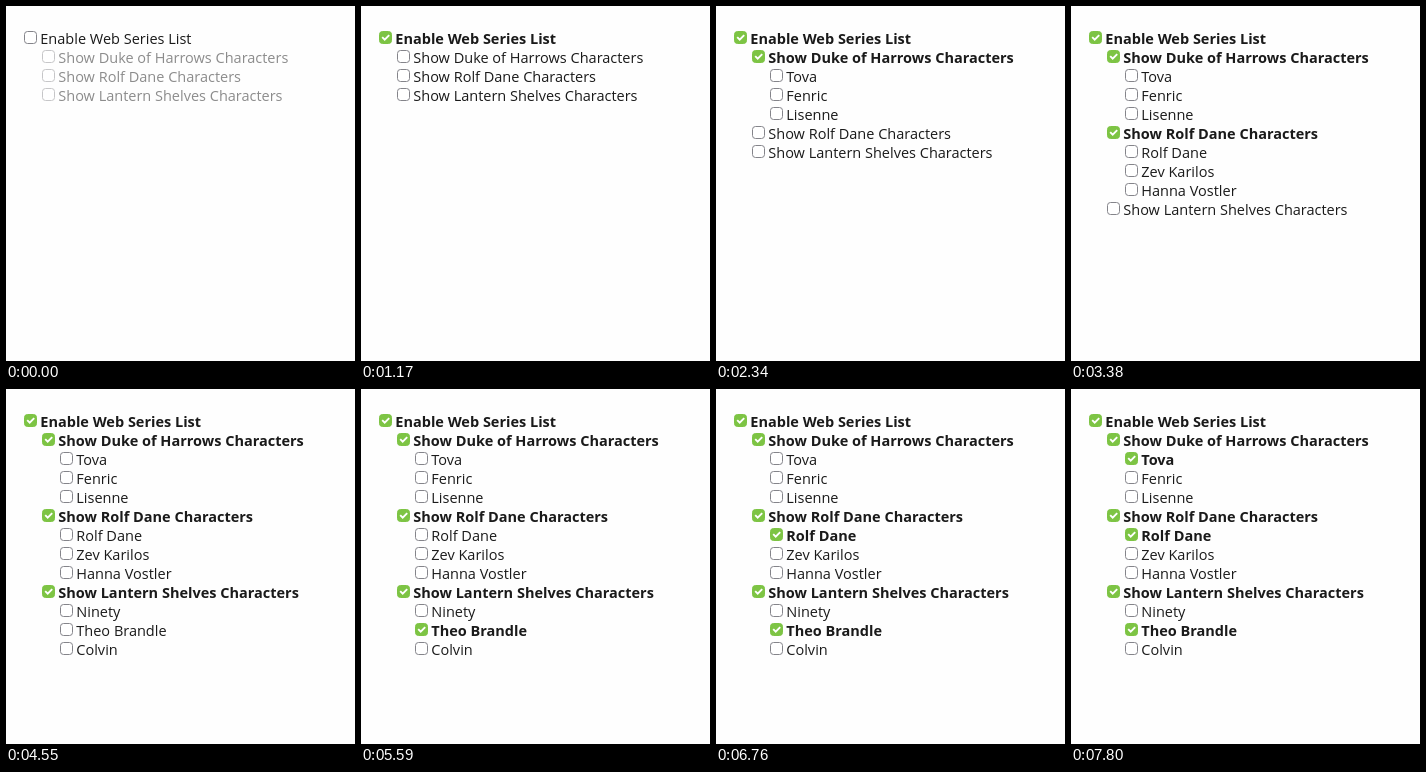
Write an HTML page that moves like this. It is 349 px wide and 355 px high and loops after 8000 ms.

```html
<!DOCTYPE html>
<html lang="en">
<head>
<meta charset="utf-8">
<title>Nested checkboxes</title>
<style>
  html, body { margin: 0; width: 100%; height: 100%; overflow: hidden; background: #fefefe; }
  svg { display: block; }
  text { font: 14.5px "Open Sans", "Noto Sans", sans-serif; fill: #1a1a1a; }
  rect { fill: #fff; stroke: #84848a; }
  path { fill: none; stroke: none; }
  .disabled text { fill: #8c8c8c; }
  .disabled rect { stroke: #c6c6c8; }
  .checked text { font-weight: 700; }
  .checked rect { fill: #7dc444; stroke: #7dc444; }
  .checked path { stroke: #fff; stroke-width: 1.9; }
</style>
</head>
<body>
<svg id="stage" width="349" height="355"></svg>
<script>
const LOOP = 8000, ROW = 19, INDENT = 18;

// checkedAt: the moment the box is ticked; children appear under a ticked parent.
const item = (label, checkedAt = Infinity, children = []) => ({ label, checkedAt, children });

const root = item('Enable Web Series List', 1170, [
  item('Show Duke of Harrows Characters', 2340, [
    item('Tova', 7800), item('Fenric'), item('Lisenne')
  ]),
  item('Show Rolf Dane Characters', 3380, [
    item('Rolf Dane', 6760), item('Zev Karilos'), item('Hanna Vostler')
  ]),
  item('Show Lantern Shelves Characters', 4550, [
    item('Ninety'), item('Theo Brandle', 5590), item('Colvin')
  ])
]);

const stage = document.getElementById('stage');

function add(parent, tag, attributes = {}) {
  const node = document.createElementNS('http://www.w3.org/2000/svg', tag);
  for (const name in attributes) node.setAttribute(name, attributes[name]);
  return parent.appendChild(node);
}

function build(entry) {
  const g = entry.node = add(stage, 'g');
  add(g, 'rect', { x: 18.5, y: 25.5, width: 12, height: 12, rx: 3 });
  add(g, 'path', { d: 'M21.2 31.2 L23.7 33.7 L28.2 29.2' });
  add(g, 'text', { x: 34.3, y: 38 }).textContent = entry.label;
  entry.children.forEach(build);
}

function draw(time) {
  let row = 0;
  function place(entry, depth, parentChecked) {
    const checked = time >= entry.checkedAt;
    const visible = depth < 2 || parentChecked;
    entry.node.setAttribute('display', visible ? 'inline' : 'none');
    entry.node.setAttribute('class', checked ? 'checked' : parentChecked ? '' : 'disabled');
    if (visible) {
      entry.node.setAttribute('transform', `translate(${depth * INDENT} ${row++ * ROW})`);
    }
    entry.children.forEach(child => place(child, depth + 1, checked));
  }
  place(root, 0, true);
}

build(root);
draw(0);
let start;
requestAnimationFrame(function tick(now) {
  start ??= now;
  draw((now - start) % LOOP);
  requestAnimationFrame(tick);
});
</script>
</body>
</html>
```
